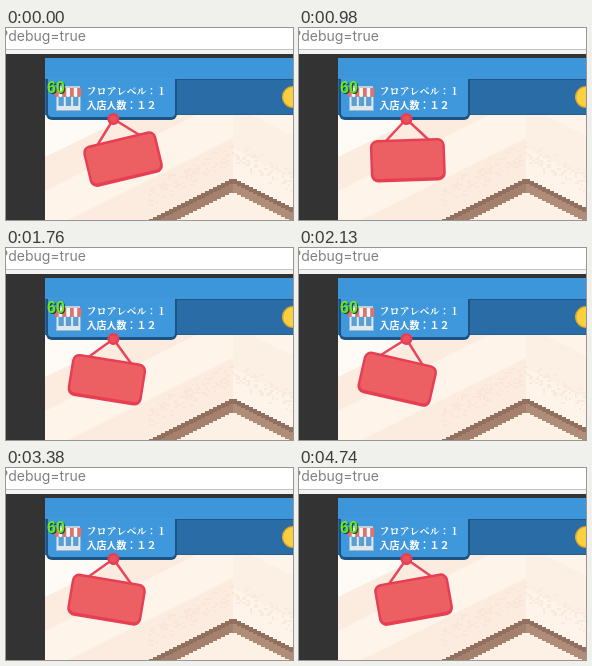
These frames come from a looping animation (287x192 px, 4.77 s). An HTML page with a canvas:

```html
<!DOCTYPE html>
<html lang="ja">
<head>
<meta charset="utf-8">
<style>
  html, body { margin: 0; width: 100%; height: 100%; overflow: hidden; background: #333; }
  canvas { display: block; width: 100vw; height: 100vh; }
</style>
</head>
<body>
<canvas id="stage" width="287" height="192"></canvas>
<script>
const W = 287, H = 192, LOOP = 4770;
const stage = document.getElementById('stage').getContext('2d');
const scenery = document.createElement('canvas');
scenery.width = W;
scenery.height = H;

function rect(c, color, x, y, w, h) {
  c.fillStyle = color;
  c.fillRect(x, y, w, h);
}

function poly(c, color, ...points) {
  c.fillStyle = color;
  c.beginPath();
  points.forEach(([x, y]) => c.lineTo(x, y));
  c.fill();
}

function rounded(c, color, x, y, w, h, radii) {
  c.fillStyle = color;
  c.beginPath();
  c.roundRect(x, y, w, h, radii);
  c.fill();
}

function disc(c, color, x, y, r) {
  c.fillStyle = color;
  c.beginPath();
  c.arc(x, y, r, 0, Math.PI * 2);
  c.fill();
}

function text(c, color, font, string, x, y) {
  c.fillStyle = color;
  c.font = font;
  c.fillText(string, x, y);
}

function seeded(seed) {
  return () => (seed = (seed * 16807) % 2147483647) / 2147483647;
}

function drawBeam(c) {
  for (let x = 135; x < W; x += 4) {
    const left = x < 227;
    const y = 151 + 2 * Math.round(Math.abs(x + 2 - 227) * 0.245);
    rect(c, '#fdf0e4', x, y, 4, H);
    rect(c, left ? '#a5806d' : '#b08d79', x, y, 4, 14);
    rect(c, '#92705f', x, y, 4, 5);
  }
}

function drawRoom(c) {
  rect(c, '#fbecdf', 39, 87, 248, 105);
  poly(c, '#fefbf7', [39, 87], [125, 87], [39, 129]);
  poly(c, '#fef4ea', [190, 87], [227, 87], [227, 110], [62, 192], [39, 192], [39, 163]);
  rect(c, '#fef4ea', 227, 87, 60, 105);
  poly(c, '#fcefe4', [227, 87], [245, 87], [287, 108], [287, 150], [227, 120]);

  // Mottled plaster follows the slope of the beam.
  const random = seeded(41);
  for (let i = 0; i < 190; i++) {
    const x = 142 + Math.floor(random() * 72) * 2;
    const slope = Math.abs(x - 227) * 0.49;
    const y = Math.round((125 + slope + (random() + random() - 1) * 13) / 2) * 2;
    rect(c, x < 227 ? '#f9e6d8' : '#faeade', x, y, 2 + Math.floor(random() * 2) * 2, 2);
  }
  drawBeam(c);
}

function drawShop(c) {
  rect(c, '#5b9fd0', 51, 66, 23, 17);
  rect(c, '#dfe8ee', 51, 78, 23, 4);
  for (let i = 0; i < 4; i++) rect(c, '#dfe8ee', 50.5 + i * 7.3, 66, 2, 17);
  rect(c, '#a3b5c4', 50, 82, 25, 1);
  rect(c, '#c3ced6', 51, 58, 23, 2);
  for (let i = 0; i < 7; i++) {
    const color = i % 2 ? '#f8f5f2' : '#e4706b';
    rounded(c, color, 49 + i * 3.75, 60, 3.75, 9, [0, 0, 2, 2]);
  }
}

function drawHud(c) {
  rect(c, '#3d96d9', 39, 30, 248, 22);
  rect(c, '#1d5789', 39, 51, 248, 1);
  rect(c, '#2a6ca6', 39, 52, 248, 34);
  rect(c, '#245f94', 39, 86, 248, 1);
  rounded(c, '#1c5383', 40, 51, 131, 41, [0, 0, 6, 6]);
  rounded(c, '#3f98dc', 42, 50, 127, 39, [0, 0, 4, 4]);
  disc(c, '#e3a62c', 287, 69, 11);
  disc(c, '#f9d040', 287, 69, 9.7);
  drawShop(c);

  text(c, '#fff', '600 10px "Noto Serif CJK JP", "Noto Sans CJK JP", serif',
    'フロアレベル：１', 80.5, 66.5);
  text(c, '#fff', 'bold 10px "Noto Sans CJK JP", "Noto Sans CJK", sans-serif',
    '入店人数：１２', 80.5, 81);

  const counterFont = 'bold 16px "Liberation Sans", Arial, sans-serif';
  text(c, '#1d4a2c', counterFont, '60', 42.2, 66.2);
  text(c, '#6be52c', counterFont, '60', 41, 65);
}

function drawScenery(c) {
  rect(c, '#333', 0, 0, W, H);
  rect(c, '#fff', 0, 0, W, 22);
  rect(c, '#c4c4c4', 0, 21, W, 1);
  rect(c, '#f3f3f3', 0, 22, W, 4);
  text(c, '#808080', '14px Inter, Roboto, sans-serif', '?debug=true', -5, 13);
  drawRoom(c);
  drawHud(c);
}

function swingAngle(t) {
  const step = Math.max(0, Math.floor((t - 22) / 47.58) + 1);
  const time = step ? 30 + (step - 1) * 47.58 : 0;
  const degrees = 14.5 * Math.cos((time + 350) / 5840 * Math.PI * 2);
  return -degrees * Math.PI / 180;
}

function drawSign(c, angle) {
  c.save();
  c.translate(107.4, 91);
  c.rotate(angle);
  c.strokeStyle = '#e9465a';
  c.lineWidth = 2.5;
  c.beginPath();
  c.moveTo(-22, 22);
  c.lineTo(0, 0);
  c.lineTo(22, 22);
  c.stroke();
  rounded(c, '#e63f54', -37.5, 20, 75, 42.5, 7.5);
  rounded(c, '#ec6064', -35, 22.5, 70, 36.5, 5);
  disc(c, '#e63f54', 0, 0, 6);
  disc(c, '#e9505b', 0, 0, 3.5);
  c.restore();
}

function frame() {
  stage.drawImage(scenery, 0, 0);
  drawSign(stage, swingAngle(performance.now() % LOOP));
  requestAnimationFrame(frame);
}

drawScenery(scenery.getContext('2d'));
frame();
</script>
</body>
</html>
```
